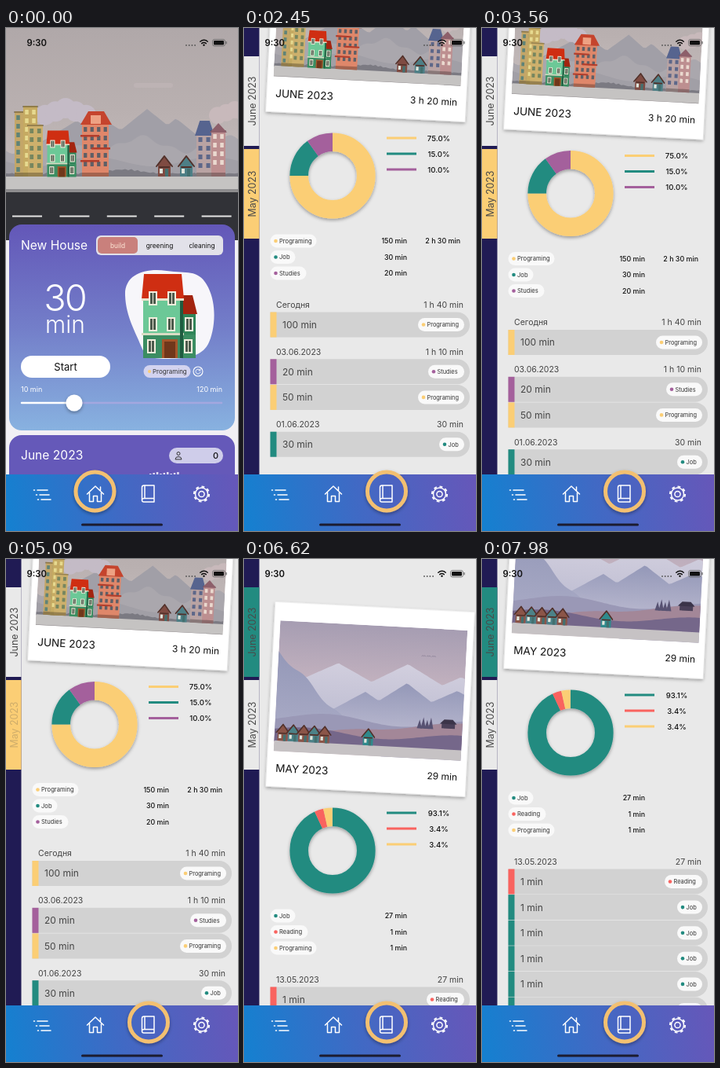
An HTML page for the animation above (8 s loop, 296 by 640 pixels).

```html
<!DOCTYPE html>
<html lang="en">
<head>
<meta charset="utf-8">
<title>Focus town</title>
<style>
html, body { margin: 0; width: 100%; height: 100%; overflow: hidden; background: #e9e9e9; }
svg { display: block; width: 100%; height: 100%; font-family: Inter, Roboto, sans-serif; }
</style>
</head>
<body>
<svg id="stage" viewBox="0 0 296 640"></svg>
<script>
const YELLOW = '#fbce75', TEAL = '#228b80', PURPLE = '#a4609c', RED = '#f9635f', PAPER = '#e9e9e9';
const colors = { Programing: YELLOW, Job: TEAL, Studies: PURPLE, Reading: RED };
const tagWidths = { Programing: 59, Job: 32, Studies: 46, Reading: 48 };

// Drawing helpers
const repeat = (n, part) => Array.from({ length: n }, (_, i) => part(i)).join('');
const rect = (x, y, w, h, fill, r = 0, more = '') =>
  `<rect x="${x}" y="${y}" width="${w}" height="${h}" fill="${fill}" rx="${r}" ${more}/>`;
const circle = (x, y, r, fill, more = '') => `<circle cx="${x}" cy="${y}" r="${r}" fill="${fill}" ${more}/>`;
const path = (d, fill, more = '') => `<path d="${d}" fill="${fill}" ${more}/>`;
const line = (d, color, w) =>
  path(d, 'none', `stroke="${color}" stroke-width="${w}" stroke-linecap="round" stroke-linejoin="round"`);
const text = (x, y, size, s, fill = '#111', anchor = 'start', more = '') =>
  `<text x="${x}" y="${y}" font-size="${size}" fill="${fill}" text-anchor="${anchor}" ${more}>${s}</text>`;
const group = (transform, body) => `<g transform="${transform}">${body}</g>`;
const gradient = (id, dir, ...stops) => `<linearGradient id="${id}" ${dir}>` +
  stops.map((c, i) => `<stop offset="${i / (stops.length - 1)}" stop-color="${c}"/>`).join('') + '</linearGradient>';
const DOWN = 'x1="0" y1="0" x2="0" y2="1"';
const MEDIUM = 'font-weight="500"';

// Fills the land below a height function
const land = (height, fill, bottom = 190) =>
  path(`M0 ${bottom}` + repeat(75, i => `L${i * 4} ${height(i * 4).toFixed(1)}`) + `V${bottom}Z`, fill);
const peak = (x, middle, slope) => Math.abs(x - middle) * slope;
const wave = (x, length, shift = 0) => Math.sin((x + shift) / length * 2 * Math.PI);

// Houses
function tower(x, y, w, wall, glass, bottom = 189) {
  const cols = Math.round(w / 9), rows = Math.floor((bottom - y - 6) / 11), dx = w / cols;
  return rect(x, y, w, bottom - y, wall) + rect(x - 1, y, w + 2, 2, '#0004') + rect(x, bottom - 5, w, 5, '#0004') +
    repeat(cols * rows, i => rect(x + dx * (i % cols) + dx / 4, y + 5 + 11 * Math.floor(i / cols), dx / 2, 6, glass));
}
const gable = (x, y, w, h, fill) => path(`M${x} ${y}l${w * .25} ${-h}h${w * .5}l${w * .25} ${h}z`, fill);
const cottage = (x, wall) => group(`translate(${x} 161)`,
  path('M3 28V13L11 3 19 13V28Z', wall) + line('M1 15L11 2 21 15M5 16H17', '#513029', 2) +
  rect(5, 18, 4, 6, '#dfe5dc') + rect(12, 18, 4, 10, '#43706f'));

const sash = (x, y) => rect(x, y, 11, 18, '#f3eedd') + rect(x + 2, y + 2, 7, 14, '#4c5a4c') + rect(x + 5, y + 2, 1, 14, '#f3eedd');
const greenHouse =
  rect(224, 362, 18, 58, '#2f8559') + gable(220, 364, 24, 24, '#a3240f') +
  rect(175, 345, 51, 75, '#6cc897') + rect(175, 390, 67, 30, '#3b8d62') +
  path('M176 313H224L227 345H173Z', '#cf2e12') + rect(173, 344, 54, 3, '#e8e2cc') + rect(173, 388, 54, 3, '#d9dcc4') +
  rect(222, 347, 4, 73, '#1f5c40') + sash(182, 335) + sash(206, 335) +
  repeat(3, i => sash(182 + i * 23, 368)) + sash(180, 396) + sash(227, 396) +
  rect(199, 396, 20, 24, '#a4562a') + rect(202, 399, 14, 21, '#70371b');

// Pictures
const cloud = (x, y, r, fill) => repeat(5, i => circle(x + (i - 2) * r, y + Math.abs(i - 2) * r / 3, r, fill));
const city =
  rect(0, 0, 296, 209, 'url(#sky)') +
  cloud(76, 102, 13, '#c4bbc6') + cloud(292, 104, 11, '#c8b9bb') + rect(163, 70, 50, 6, '#bdb3b4', 3) +
  land(x => 103 + Math.min(peak(x, 180, .8), 12 + peak(x, 217, .8), 15 + peak(x, 90, .6), 17 + peak(x, 130, .6)), '#a19fa7') +
  land(x => 148 + wave(x, 110, 20) * 9 + wave(x, 37) * 3, '#aaa7ad') +
  land(x => 170 + wave(x, 150) * 6, '#a19fa6') +
  land(x => 185 - 5 * Math.exp(-(((x - 150) / 28) ** 2)) + wave(x, 9), '#7b7a82') +
  rect(0, 189, 296, 16, '#c5c3c2') + rect(0, 205, 296, 4, '#8d8c8e') +
  tower(11, 106, 18, '#c3a668', '#5f8377') + tower(22, 99, 18, '#c5aa62', '#e6d98f') + tower(28, 123, 19, '#cdb06c', '#76865f') +
  group('translate(-43.7 -41.7) scale(.55)', greenHouse) +
  tower(97, 121, 34, '#df876a', '#5e5f66') + gable(95, 123, 40, 17, '#c5442d') + rect(108, 111, 13, 11, '#eda183') +
  repeat(3, i => rect(95 + i % 2 * 14, 136 + i * 16, 24, 2.5, '#b33d2b')) +
  cottage(191, '#7f4b42') + cottage(219, '#4d7f86') +
  tower(243, 134, 20, '#b9a3a3', '#5d6789') + gable(241, 137, 25, 19, '#56648f') +
  tower(262, 130, 18, '#bd8f90', '#ead9cf') + path('M260 133L271 121 282 133Z', '#8d5f6a');

const bird = x => line(`M${x} 44q2 -2 3 0q1 -2 3 0`, '#6f6880', .6);
const valley =
  rect(0, 0, 296, 206, 'url(#dusk)') +
  land(x => 62 + Math.min(peak(x, 95, .5), peak(x, 205, .55) - 4, 12 + peak(x, 290, .5)), 'url(#snow)') +
  land(x => Math.min(88 + peak(x, 205, .7), 96 + peak(x, 285, .5), 105 + peak(x, 140, .6)), 'url(#haze)') +
  land(x => 48 + x * .95 + wave(x, 60) * 4, 'url(#haze)') +
  land(x => 150 + wave(x, 230, 90) * 7, '#9a98b6') +
  land(x => 180 - x * .11 + wave(x, 150) * 2, '#a38798') +
  land(x => 172 + wave(x, 240, 130) * 6, '#75678a') +
  repeat(4, i => path(`M${224 + i * 6} 158l4 ${-14 - i % 2 * 4}l4 ${14 + i % 2 * 4}z`, '#575272')) +
  rect(263, 148, 21, 8, '#4a4058') + gable(260, 149, 27, 7, '#3b3449') + repeat(3, i => bird(226 + i * 8)) +
  rect(0, 189, 296, 17, '#c6c2c4') + repeat(5, i => cottage(2 + i * 16.5, i % 2 ? '#4c8288' : '#8b5548')) + cottage(137, '#2f8a8c');

// Home screen
const option = (x, s, fill) => text(x, 279.5, 8.3, s, fill, 'middle');
const home = rect(0, 0, 296, 640, '#f1f0f4') + city + rect(0, 209, 296, 61, '#313237') +
  repeat(5, i => rect(8 + i * 60.4, 238.5, 38, 2, '#e4e4e4')) +
  rect(4, 250, 288, 262, 'url(#panel)', 16) + text(19, 281.5, 15.6, 'New House', '#fff') +
  rect(115, 264, 162, 25, '#e2e1e9', 6) + rect(117, 266, 51, 21, '#c9807c', 5) +
  option(142.5, 'build', '#ffe9d8') + option(196, 'greening') + option(250, 'cleaning') +
  text(75, 360, 47, '30', '#fff', 'middle', 'font-weight="300" letter-spacing="-2"') +
  text(75.5, 388, 30, 'min', '#fff', 'middle', 'font-weight="300"') +
  path('M152 340C151 313 178 305 205 309S246 306 258 330 266 386 258 402 229 421 208 421 178 420 172 404 153 368 152 340Z', '#f7f6fa') +
  greenHouse +
  rect(175.5, 429, 60, 16, '#d3d3ef', 8) + circle(183, 437, 2, YELLOW) + text(187, 440, 8, 'Programing', '#333') +
  circle(245, 437, 6, 'none', 'stroke="#fff" stroke-width="1.1"') + line('M247.5 435.3a3 3 0 1 0 .5 2.4M248 433.7v2h-2', '#fff', .9) +
  rect(19, 417, 114, 28, '#fff', 14) + text(76, 436, 13, 'Start', '#111', 'middle') +
  text(19, 463, 9, '10 min', '#fff') + text(276, 463, 9, '120 min', '#fff', 'end') +
  line('M87 477H275', '#a3a7df', 2.5) + line('M20 477H87', '#fff', 2.5) + circle(87, 477, 10.5, '#fff', 'filter="url(#shade)"') +
  rect(4, 518, 288, 100, '#6559b9', 16) + text(19, 549, 15.6, 'June 2023', '#fff') +
  rect(208, 534, 69, 20, '#cfcdea', 10) + circle(220, 541.5, 2, 'none', 'stroke="#333"') +
  line('M216 548.5q0 -3 4 -3t4 3z', '#333', 1) + text(271, 548, 11, '0', '#111', 'end', MEDIUM) +
  repeat(9, i => rect(183 + i * 4.4, 567 - i % 3, 2.5, 3, '#e0ddf3'));

// Journal pages; y = 0 is the middle of the ring chart
const tag = (x, y, name, size) => rect(x, y - 8.5, tagWidths[name], 17, '#f9f9f9', 8.5) +
  circle(x + 7, y, 2.3, colors[name]) + text(x + 11.5, y + 2.8, size, name, '#333');

function journal({ title, total, picture, shares, days }) {
  let out = group('translate(161 -192.5) rotate(3)',
    rect(-127.3, -117.5, 254.6, 235, '#fff', 0, 'filter="url(#shade)"') +
    group('translate(-119.7 -94) scale(.808)', `<g clip-path="url(#frame)">${picture}</g>`) +
    text(-116, 98.5, 13.6, title) + text(116, 97.5, 12, total, '#111', 'end'));
  let turned = 0, ring = '';
  shares.forEach(([name, percent, time, extra = ''], i) => {
    const y = 83 + i * 20.5;
    ring += circle(0, 0, 42.8, 'none', `stroke="${colors[name]}" stroke-width="23.6" pathLength="100"
      stroke-dasharray="${percent} 100" stroke-dashoffset="${-turned}"`);
    turned += percent;
    out += rect(182, -49.5 + i * 20, 38, 3, colors[name]) +
      text(248.5, -44.3 + i * 20, 9.6, percent.toFixed(1) + '%', '#111', 'middle', MEDIUM) +
      tag(33.5, y, name, 7.6) + text(208, y + 3.2, 8.9, time, '#111', 'end', MEDIUM) +
      text(276, y + 3.2, 8.9, extra, '#111', 'end', MEDIUM);
  });
  out += `<g filter="url(#shade)">${group('translate(113 0) rotate(-90)', ring)}</g>`;
  let y = 164;
  for (const [day, sum, rows] of days) {
    out += text(41, y + 3.8, 10.5, day, '#444') + text(280, y + 3.8, 10.5, sum, '#444', 'end');
    y += 25.5;
    for (const [time, name] of rows) {
      out += path(`M33.5 ${y - 16}H272a16 16 0 0 1 0 32H33.5Z`, '#d2d2d2') +
        rect(33.5, y - 16, 8, 32, colors[name]) + text(49, y + 4.4, 12, time, '#444') +
        tag(281 - tagWidths[name], y, name, 7.4);
      y += 32.6;
    }
    y += 1.7;
  }
  return out;
}

const june = journal({
  title: 'JUNE 2023', total: '3 h 20 min', picture: city,
  shares: [['Programing', 75, '150 min', '2 h 30 min'], ['Job', 15, '30 min'], ['Studies', 10, '20 min']],
  days: [
    ['Сегодня', '1 h 40 min', [['100 min', 'Programing']]],
    ['03.06.2023', '1 h 10 min', [['20 min', 'Studies'], ['50 min', 'Programing']]],
    ['01.06.2023', '30 min', [['30 min', 'Job']]]
  ]
});
const may = journal({
  title: 'MAY 2023', total: '29 min', picture: valley,
  shares: [['Job', 93.1, '27 min'], ['Reading', 3.4, '1 min'], ['Programing', 3.4, '1 min']],
  days: [['13.05.2023', '27 min', [['1 min', 'Reading'], ...Array(9).fill(['1 min', 'Job'])]]]
});

const sideTab = (id, y, label) => rect(0, y, 19.5, 114, PAPER, 0, `id="${id}Tab"`) +
  group(`translate(15 ${y + 57}) rotate(-90)`, text(0, 0, 12.4, label, '#4a4a4a', 'middle', `id="${id}Label"`));

// Bars
const status = text(26.5, 22.7, 11.3, '9:30', '#111', 'start', 'font-weight="600"') +
  repeat(4, i => circle(230 + i * 3.7, 22, .9, '#555')) +
  line('M247.8 17.2q4.7 -4 9.4 0M249.7 19.6q2.8 -2.3 5.6 0', '#111', 1.5) + circle(252.5, 21.8, 1.2, '#111') +
  rect(263.5, 14.5, 16, 8.5, 'none', 2.5, 'stroke="#666" stroke-width=".8"') + rect(265, 16, 13, 5.5, '#111', 1.3) +
  rect(280.5, 17, 1.2, 3.4, '#666', .6);
const outline = (r, w, more = '') => circle(249.5, 593, r, 'none', `stroke="#fff" stroke-width="${w}" ${more}`);
const icons =
  line('M35.5 588h1M40 588h13M38.5 594h1M43 594h12M40.5 600h1M45 600h12', '#fff', 1.6) +
  line('M103.5 593L114 583 124.5 593M106.5 591V602.5H111.5V595.5H116.5V602.5H121.5V591M120.5 588V584', '#fff', 1.5) +
  line('M173.5 600V584.5q0 -2.5 2.5 -2.5H189V598.5H176q-2.5 0 -2.5 2.2t2.5 2.3H189V598.5M177 582.5V598', '#fff', 1.5) +
  outline(3.6, 1.5) + outline(8, 1.4) + outline(9.6, 2, 'pathLength="80" stroke-dasharray="5 5"');

const stage = document.getElementById('stage');
stage.innerHTML = '<defs>' +
  gradient('sky', DOWN, '#b0a8a9', '#b9b0b0', '#c8bfbf') + gradient('dusk', DOWN, '#a69db2', '#c6b4c0', '#dccbd0') +
  gradient('snow', DOWN, '#d2cfde', '#b6b6cd') + gradient('haze', DOWN, '#9498b8', '#c3c1d5') +
  gradient('panel', DOWN, '#6357b8', '#737ec9', '#88b2e0') +
  gradient('bar', 'gradientUnits="userSpaceOnUse" x1="0" y1="620" x2="296" y2="580"', '#1580d0', '#4169c4', '#6657b9') +
  '<clipPath id="frame"><rect width="296" height="205.5"/></clipPath>' +
  '<filter id="shade" x="-20%" y="-20%" width="140%" height="140%"><feDropShadow dx="0" dy="2" stdDeviation="2" flood-opacity=".35"/></filter></defs>' +
  `<g id="home">${home}</g><g id="journal">` + rect(0, 0, 296, 640, PAPER) +
  `<g id="june">${june}</g><g id="may">${may}</g>` + rect(0, 0, 19.5, 640, '#201b54') +
  sideTab('june', 36, 'June 2023') + sideTab('may', 154, 'May 2023') + '</g>' +
  status + rect(0, 568, 296, 72, 'url(#bar)') +
  circle(0, 589.5, 24.5, 'url(#bar)', 'id="ring" stroke="#f3c071" stroke-width="5" filter="url(#shade)"') +
  icons + rect(96, 630.5, 104, 3, '#1c1c30', 1.5);

// Motion: [time, value] keys; the list is pulled past each end, held, then springs back
const LOOP = 8000, OPEN = 500, PRESS = 5080, SWAP = 5310;
const TOP = 354, END = 210.5, PULLED_UP = 188, PULLED_DOWN = 371;
const scroll = [[2040, TOP], [2450, PULLED_UP], [3100, PULLED_UP], [3560, END],
  [6285, END], [6620, PULLED_DOWN], [7180, PULLED_DOWN], [7510, TOP], [7790, TOP], [7980, 221]];

function along(keys, t) {
  const i = keys.findIndex(k => k[0] > t);
  if (i < 0) return keys[keys.length - 1][1];
  if (i === 0) return keys[0][1];
  const [t0, a] = keys[i - 1], [t1, b] = keys[i], p = (t - t0) / (t1 - t0);
  return a + (b - a) * p * p * (3 - 2 * p);
}

const set = (id, name, value) => document.getElementById(id).setAttribute(name, value);
const show = (id, on) => set(id, 'display', on ? 'inline' : 'none');

function draw(t) {
  const isMay = t >= SWAP, shift = `translate(0 ${along(scroll, t)})`;
  show('home', t < OPEN);
  show('journal', t >= OPEN);
  show('june', !isMay);
  show('may', isMay);
  set('june', 'transform', shift);
  set('may', 'transform', shift);
  set('juneTab', 'fill', isMay ? TEAL : PAPER);
  set('mayTab', 'fill', isMay ? PAPER : YELLOW);
  set('mayLabel', 'opacity', t < PRESS ? 1 : along([[SWAP, .25], [5670, 1]], t));
  set('ring', 'cx', along([[OPEN, 113.5], [720, 182]], t));
}

const start = performance.now();
function tick() {
  draw((performance.now() - start) % LOOP);
  requestAnimationFrame(tick);
}
tick();
</script>
</body>
</html>
```
